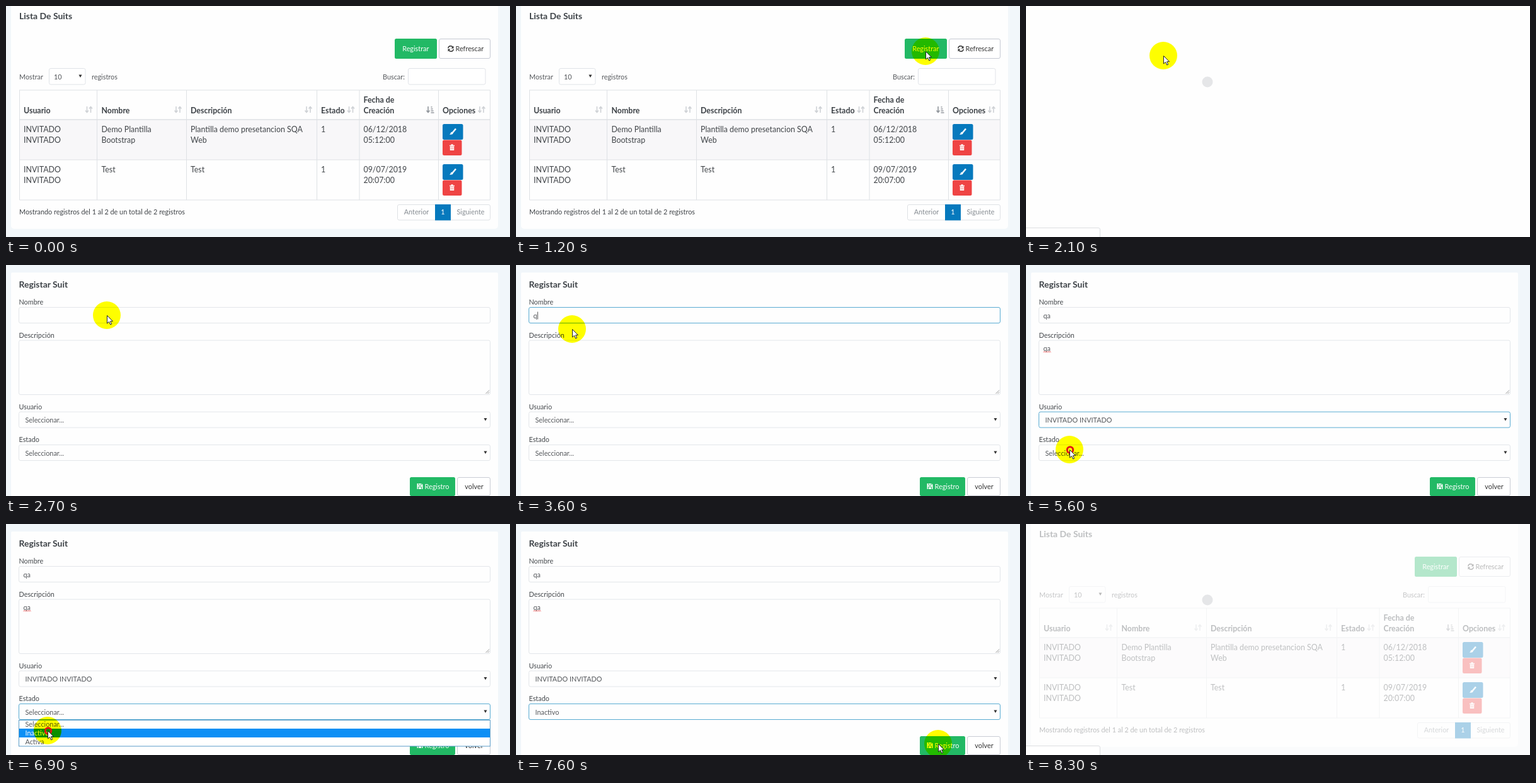
These frames come from a looping animation (800 px wide and 368 px high, 8.4 s). An HTML page:

```html
<!DOCTYPE html>
<html lang="es">
<head>
<meta charset="utf-8">
<title>Lista De Suits</title>
<style>
  html, body { margin: 0; width: 100%; height: 100%; overflow: hidden; background: #fff; }
  svg { display: block; width: 800px; height: 368px; font: 10.85px Lato, sans-serif; }
  .halo { mix-blend-mode: multiply; }
</style>
</head>
<body>
<svg id="stage" viewBox="0 0 800 368"></svg>
<script>
const LOOP = 8400, STEP = 100;
const GREEN = '#22b965', BLUE = '#0679bd', RED = '#ef4444', LINE = '#dee1e5', FOCUS = '#58abd2';
const USER = 'INVITADO';
const stage = document.getElementById('stage');

// Pointer path: time, x, y
const path = [
  [100, 514, 161], [200, 504, 179], [400, 504, 179], [900, 610, 108], [1200, 650, 72],
  [1400, 650, 72], [2100, 218, 79], [2700, 160, 80], [3200, 92, 81], [3600, 89, 102],
  [4000, 83, 150], [4500, 76, 252], [4800, 74, 260], [4900, 74, 260], [5200, 70, 279],
  [5300, 70, 279], [5500, 69, 294], [5800, 69, 294], [6400, 66, 329], [6900, 66, 329],
  [7000, 80, 330], [7600, 670, 350], [7700, 676, 352], [8000, 676, 352]
];
const clicks = [1300, 3200, 4900, 5300, 5600, 6900, 7800];

const text = (x, y, s, { size = 10.85, fill = '#55585c', bold, anchor = 'start' } = {}) =>
  `<text x="${x}" y="${y}" font-size="${size}" fill="${fill}" text-anchor="${anchor}"${bold ? ' font-weight="700"' : ''}>${s}</text>`;

const box = (x, y, x2, y2, fill, stroke = 'none', r = 2.5) =>
  `<rect x="${x}" y="${y}" width="${x2 - x}" height="${y2 - y}" rx="${r}" fill="${fill}" stroke="${stroke}"/>`;

const draw = (d, stroke, width = 1, fill = 'none') =>
  `<path d="${d}" fill="${fill}" stroke="${stroke}" stroke-width="${width}"/>`;

const at = (x, y, s) => `<g transform="translate(${x} ${y})">${s}</g>`;
const fade = (opacity, s) => opacity > 0 ? `<g opacity="${opacity}">${s}</g>` : '';
const caretDown = (x, y) => draw(`M${x - 2.5} ${y - 2}h5l-2.5 4.5z`, 'none', 0, '#333');

function sortIcon(x, active) {
  const down = 'M-3 -5V4M-5.5 1.5L-3 4.5L-.5 1.5';
  return at(x, 165, active
    ? draw(down + 'M1.5 -4h2M1.5 -1h3M1.5 2h4M1.5 5h5', '#92979d', 1.6)
    : draw(down + 'M3 5V-4M.5 -1.5L3 -4.5L5.5 -1.5', '#cfd2d6', 1.6));
}

function optionButtons(y) {
  const brush = draw('M5 -5L0 1', '#fff', 2.5) + draw('M-1 0L1 2Q0 5 -5 4Q-3 3 -3 1Z', 'none', 0, '#fff');
  const bin = draw('M-4 -3h8M-1.5 -4.5h3', '#fff', 1.3) + draw('M-3.2 -1.8h6.4v6.3h-6.4z', 'none', 0, '#fff') +
    draw('M-1.2 -.5v3.8M1.2 -.5v3.8', RED, .7);
  return box(693, y, 725.5, y + 25, BLUE) + at(709, y + 12.5, brush) +
    box(693, y + 25.5, 723.5, y + 50, RED) + at(708, y + 37.5, bin);
}

function tableRow(y, cells) {
  const xs = [28, 151.5, 293, 500, 567.5];
  return cells.map((lines, i) => lines.map((s, k) =>
    text(xs[i], y + 20 + k * 16.7, s, { size: 12.4, fill: '#414549' })).join('')).join('') + optionButtons(y + 7);
}

function listPage() {
  const head = { size: 12.4, bold: true, fill: '#3d4247' };
  const refresh = draw('M-4.2 -.7A4 4 0 0 1 3.2 -2.4M4.2 .7A4 4 0 0 1 -3.2 2.4', '#333', 1.5) +
    draw('M4.5 -4.5v4h-4zM-4.5 4.5v-4h4z', 'none', 0, '#333');
  return box(0, 0, 800, 368, '#f2f7fa', 'none', 0) + box(8, -10, 781, 355, '#fefefe', 'none', 5) +
    text(21, 21, 'Lista De Suits', { size: 13.95, bold: true, fill: '#3d4247' }) +
    box(617, 52, 684, 84, GREEN) + text(650.3, 71.7, 'Registrar', { fill: '#fff', anchor: 'middle' }) +
    box(687.5, 52.5, 768.5, 83.5, '#fff', '#c5c9d2') + at(706, 68, refresh) +
    text(713.5, 71.7, 'Refrescar', { fill: '#333' }) +
    text(21, 116.5, 'Mostrar') + box(68.5, 99.5, 126, 125, '#fff', '#e0e3e8') +
    text(76, 116.5, '10') + caretDown(118, 111.5) + text(136, 116.5, 'registros') +
    text(598, 116.5, 'Buscar:') + box(638.5, 99.5, 761, 125, '#fff', '#e0e3e8') +
    box(21, 181, 768, 245, '#f8f7f9', 'none', 0) +
    draw('M21 134H768.5V309H21.5V134M144.5 134V309M286.5 134V309M493.5 134V309M561 134V309M686.5 134V309M21 245H768', LINE) +
    draw('M21 181H768', LINE, 1.6) +
    text(28, 170.5, 'Usuario', head) + text(151.5, 170.5, 'Nombre', head) + text(293, 170.5, 'Descripción', head) +
    text(500, 170.5, 'Estado', head) + text(567.5, 153.5, 'Fecha de', head) +
    text(567.5, 170.5, 'Creación', head) + text(693, 170.5, 'Opciones', head) +
    [131.5, 273, 480, 547.5, 755].map(x => sortIcon(x)).join('') + sortIcon(673, true) +
    tableRow(181, [[USER, USER], ['Demo Plantilla', 'Bootstrap'], ['Plantilla demo presetancion SQA', 'Web'], ['1'], ['06/12/2018', '05:12:00']]) +
    tableRow(245, [[USER, USER], ['Test'], ['Test'], ['1'], ['09/07/2019', '20:07:00']]) +
    text(21, 331.8, 'Mostrando registros del 1 al 2 de un total de 2 registros', { fill: '#3f4347' }) +
    box(621.5, 316.5, 768.5, 341, '#fff', LINE) + box(681, 316, 706, 341.5, BLUE, 'none', 0) +
    text(651.5, 332.3, 'Anterior', { fill: '#868c92', anchor: 'middle' }) +
    text(693.5, 332.3, '1', { fill: '#fff', anchor: 'middle' }) +
    text(737.5, 332.3, 'Siguiente', { fill: '#868c92', anchor: 'middle' });
}

function field(label, y, y2, value, focused, kind) {
  const isSelect = kind === 'select', base = y + 17.5;
  const width = value === 'qa' ? 12 : value === 'q' ? 6.5 : 0;
  let s = text(20.5, y - 4, label, { fill: '#44484c' }) +
    box(20.5, y + .5, 768.5, y2 - .5, '#fefefe', focused ? FOCUS : '#e3e6ea') +
    text(isSelect ? 30.5 : 27.5, base, value);
  if (isSelect) s += caretDown(761, y + 12.5);
  else if (focused) s += draw(`M${28 + width} ${base - 10}v12`, '#333', .8);
  if (kind === 'area') {
    s += draw(`M761.5 ${y2 - 2}l5.5 -5.5M764.5 ${y2 - 2}l2.5 -2.5`, '#888', .9);
    if (value === 'qa' && !focused) s += draw(`M27.5 ${base + 2}${'l1.5 -1.3l1.5 1.3'.repeat(4)}`, '#e33', .8);
  }
  return s;
}

function dropDown(y, items, active) {
  return box(20.5, y + .5, 768.5, y + items.length * 14, '#fff', '#5a9cc8', 0) +
    items.map((s, i) => (i === active ? box(21, y + i * 14, 768, y + i * 14 + 14, '#0c8ff5', 'none', 0) : '') +
      text(30.5, y + 11.3 + i * 14, s, { fill: i === active ? '#fff' : '#55585c' })).join('');
}

function formPage(t, pointerY) {
  const typed = (a, b) => t < a ? '' : t < b ? 'q' : 'qa';
  const focus = t < 3300 ? -1 : t < 4000 ? 0 : t < 5000 ? 1 : t < 5800 ? 2 : 3;
  const pick = 'Seleccionar...';
  const person = USER + ' ' + USER;
  const disk = draw('M-4.5 -4.5h7l2 2v7h-9z', 'none', 0, '#fff') +
    draw('M-2 -4.5v3h4v-3M-2.5 4.5v-3.5h5v3.5', GREEN, 1);
  let s = box(0, 0, 800, 368, '#f1f6fa', 'none', 0) + box(8, 12, 781, 380, '#fefefe', 'none', 2) +
    text(20.5, 36, 'Registar Suit', { size: 13.95, bold: true, fill: '#3d4247' }) +
    field('Nombre', 67, 93, typed(3500, 3800), focus === 0) +
    field('Descripción', 119.5, 207, typed(4200, 4300), focus === 1, 'area') +
    field('Usuario', 233.5, 259.5, t < 5400 ? pick : person, focus === 2, 'select') +
    field('Estado', 286, 312, t < 7000 ? pick : 'Inactivo', focus === 3, 'select') +
    box(641, 338, 713, 368, GREEN) + at(657, 352.5, disk) +
    text(664.5, 356.7, 'Registro', { fill: '#fff' }) +
    box(716.5, 338.5, 768.5, 367.5, '#fff', '#c9ccd4') + text(743, 356.7, 'volver', { fill: '#333', anchor: 'middle' });
  if (t >= 5000 && t < 5400) s += dropDown(259.5, [pick, person], pointerY > 273 ? 1 : 0);
  if (t >= 5900 && t < 7000) s += dropDown(312, [pick, 'Inactivo', 'Activa'], pointerY > 326 ? 1 : 0);
  return s;
}

function pointerAt(t) {
  const i = Math.max(1, path.findIndex(p => p[0] >= t));
  const [t0, x0, y0] = path[i - 1], [t1, x1, y1] = path[i];
  const k = (t - t0) / (t1 - t0);
  return [x0 + (x1 - x0) * k, y0 + (y1 - y0) * k];
}

function pointer(t, [x, y]) {
  const ring = clicks.includes(t) ? '<circle cx=".5" r="4.7" fill="none" stroke="#e51313" stroke-width="3"/>' : '';
  return `<circle class="halo" cx="${x}" cy="${y}" r="22" fill="#ff0"/>` +
    at(x + .5, y + .5, ring + draw('M0 0V12.5L3 9.8L5.2 14.5L7.2 13.6L5.1 9.2H9Z', '#222', 1, '#fff'));
}

function render(t) {
  const shown = t >= 100 && t < 8000;
  const pos = shown ? pointerAt(t) : [0, 0];
  const listOpacity = t < 1400 ? 1 : t < 1500 ? .5 : t < 8200 ? 0 : t < 8300 ? .1 : .33;
  const formOpacity = t < 2300 || t >= 7900 ? 0 : Math.min(1, .33 * ((t - 2300) / STEP + 1));
  const loading = t >= 1500 && t < 2500 || t >= 7900;
  stage.innerHTML = box(0, 0, 800, 368, '#fefefe', 'none', 0) +
    fade(listOpacity, listPage()) + fade(formOpacity, formPage(t, pos[1])) +
    (loading ? '<circle cx="288" cy="121" r="8.5" fill="#e5e6e8"/>' + box(-5, 353.5, 117.5, 375, '#fff', '#dcdee1') : '') +
    (shown ? pointer(t, pos) : '');
}

let last = -1;
const start = performance.now();
function tick() {
  const t = Math.floor((performance.now() - start) % LOOP / STEP) * STEP;
  if (t !== last) render(last = t);
  requestAnimationFrame(tick);
}
tick();
</script>
</body>
</html>
```
